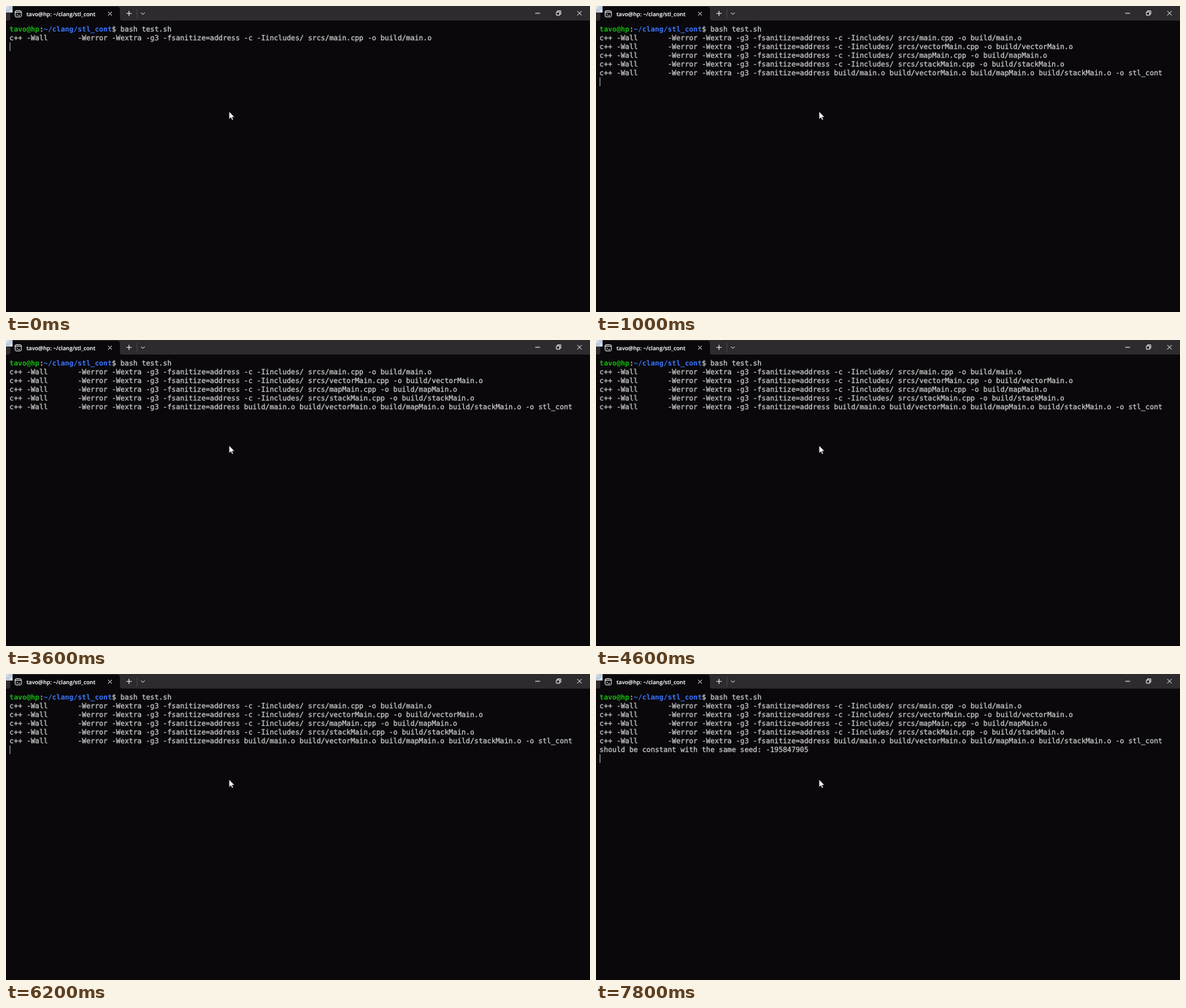
Recreate the animation shown at these times as an HTML page. Size 800 by 420 pixels, loop 8000 ms.

```html
<!DOCTYPE html>
<html lang="en">
<head>
<meta charset="utf-8">
<title>Terminal</title>
<style>
  html, body { margin: 0; width: 100%; height: 100%; overflow: hidden; background: #0a080b; }
  svg { display: block; width: 800px; height: 420px; }
  text { white-space: pre; text-rendering: geometricPrecision; }
  .term { font: 9.71px "DejaVu Sans Mono", "Noto Sans Mono", monospace; fill: #ccc; stroke: #ccc; stroke-width: .25px; }
  .user { fill: #16b80e; font-weight: bold; stroke: none; }
  .path { fill: #3b78ff; font-weight: bold; stroke: none; }
  .title { font: 600 7.6px "Open Sans", "Noto Sans", sans-serif; fill: #fff; stroke: #fff; stroke-width: .1px; }
  .line { fill: none; stroke: #e8e8e8; stroke-width: 1; }
</style>
</head>
<body>
<svg viewBox="0 0 800 420">
  <rect width="800" height="420" fill="#0a080b"/>
  <rect width="800" height="20" fill="#2d2b2e"/>
  <path d="M3 20Q6 20 6 17V5Q6 1 10 1H152Q156 1 156 5V17Q156 20 159 20Z" fill="#0a080b"/>
  <rect width="9" height="9" fill="#bccbdc"/>
  <path d="M0 0H4V4H0ZM5 5H9V9H5Z" fill="#d3dde8"/>

  <rect x="12.5" y="6.5" width="8.5" height="8.5" rx="1.5" class="line"/>
  <path d="M12.5 8.5H21M14.5 10.5L16 11.7L14.5 13M17 13H19" class="line" stroke-width=".8"/>
  <text class="title" x="28" y="13.8">tavo@hp: ~/clang/stl_cont</text>
  <path d="M139.8 8L145 13.2M145 8L139.8 13.2" class="line"/>
  <path d="M165 10.2H172M168.5 6.7V13.7" class="line"/>
  <path d="M179.5 4V17" stroke="#444346"/>
  <path d="M185 9.1L187.5 11.6L190 9.1" class="line"/>
  <path d="M725 10H731.5" class="line"/>
  <path d="M754 8.2H758.5V12.7H754ZM755.5 8.2V6.7H760V11.2H758.5" class="line"/>
  <path d="M782.6 6.9L788.6 12.9M788.6 6.9L782.6 12.9" class="line"/>

  <g id="screen"></g>
  <rect id="caret" x="5" width="1" height="12" fill="#999"/>
  <path d="M305.7 145V155.2L308.1 153L309.7 156.6L311.3 155.9L309.7 152.4H312.9Z" fill="#fff" stroke="#111" stroke-width=".4"/>
</svg>
<script>
const LOOP = 8000, ROW = 12, TOP = 26, LEFT = 4.8;
const cc = 'c++ -Wall       -Werror -Wextra -g3 -fsanitize=address ';
const compile = name => `${cc}-c -Iincludes/ srcs/${name}.cpp -o build/${name}.o`;
const units = ['main', 'vectorMain', 'mapMain', 'stackMain'];

const rows = [
  [['user', 'tavo@hp'], ['', ':'], ['path', '~/clang/stl_cont'], ['', '$ bash test.sh']],
  ...units.map(u => [['', compile(u)]]),
  [['', `${cc}${units.map(u => `build/${u}.o`).join(' ')} -o stl_cont`]],
  [['', 'should be constant with the same seed: -195847905']]
];

// [start ms, rows printed, caret visible]
const steps = [
  [0, 2, 1], [600, 2, 0], [1000, 6, 1], [1200, 6, 0], [1800, 6, 1],
  [2400, 6, 0], [2800, 6, 1], [3400, 6, 0], [4000, 6, 1], [4400, 6, 0],
  [5000, 6, 1], [5600, 6, 0], [6200, 6, 1], [6800, 7, 1], [7400, 7, 0],
  [7800, 7, 1]
];

const NS = 'http://www.w3.org/2000/svg';
const screen = document.getElementById('screen');
const caret = document.getElementById('caret');

function add(parent, tag, attrs, content = '') {
  const el = document.createElementNS(NS, tag);
  for (const key in attrs) el.setAttribute(key, attrs[key]);
  el.textContent = content;
  return parent.appendChild(el);
}

const lines = rows.map((parts, i) => {
  const line = add(screen, 'text', { class: 'term', x: LEFT, y: TOP + ROW * i + 9 });
  for (const [style, content] of parts) add(line, 'tspan', { class: style }, content);
  return line;
});

function draw(now) {
  const t = now % LOOP;
  const [, count, on] = steps.findLast(s => s[0] <= t);
  lines.forEach((line, i) => line.setAttribute('visibility', i < count ? 'visible' : 'hidden'));
  caret.setAttribute('y', TOP + ROW * count);
  caret.setAttribute('visibility', on ? 'visible' : 'hidden');
}

const start = performance.now();
function tick() {
  draw(performance.now() - start);
  requestAnimationFrame(tick);
}
tick();
</script>
</body>
</html>
```
